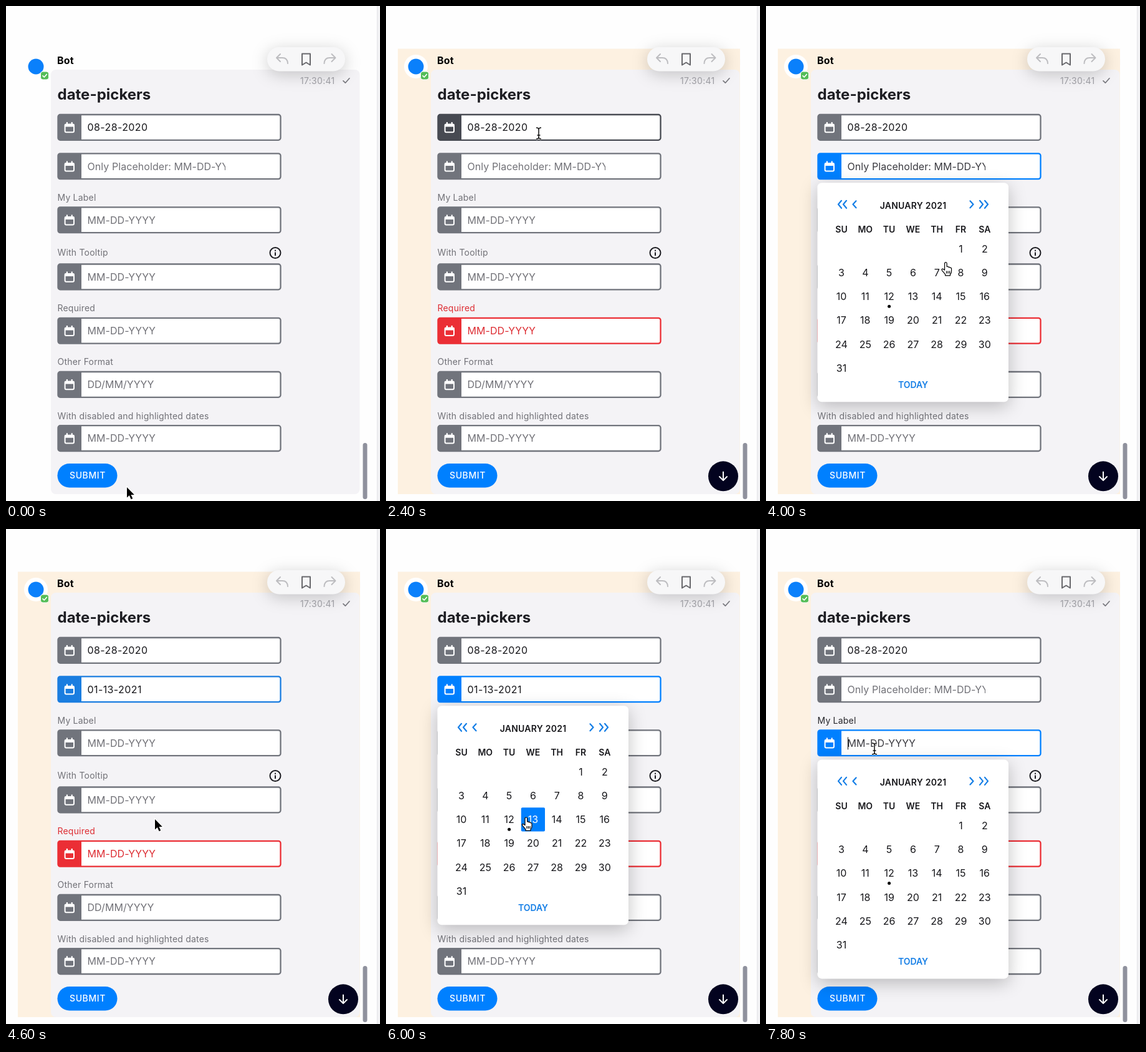
Animation of 600 by 793 pixels, one loop 8 s. Source, as an HTML page:

```html
<!DOCTYPE html>
<html lang="en">
<head>
<meta charset="utf-8">
<title>Date pickers</title>
<style>
html, body { margin: 0; width: 100%; height: 100%; overflow: hidden; background: #fff; }
svg { display: block; width: 100%; height: 100%; font-family: Inter, Roboto, sans-serif; }
.value { font-size: 16px; letter-spacing: .4px; }
.hint { font-size: 16px; letter-spacing: .06px; }
.label { font-size: 14px; letter-spacing: .2px; }
.day { font-size: 16px; text-anchor: middle; fill: #17171b; }
.cap { font-size: 14px; font-weight: 600; text-anchor: middle; fill: #17171b; }
.line { fill: none; stroke-linecap: round; stroke-linejoin: round; }
.pill { filter: drop-shadow(0 5px 13px rgba(0, 0, 0, .2)); }
.popup { filter: drop-shadow(0 7px 14px rgba(0, 0, 0, .24)); }
</style>
</head>
<body>
<svg viewBox="0 0 600 793" xmlns="http://www.w3.org/2000/svg">
  <defs>
    <clipPath id="input"><rect x="124" y="170" width="228" height="560"/></clipPath>
    <g id="calendar">
      <rect x="-7.2" y="-5" width="14.4" height="12.6" rx="2" fill="none" stroke="#fff" stroke-width="2"/>
      <path d="M-7.5-5.5h15v4.5h-15zM-5-8.5h2.2v4h-2.2zM2.8-8.5h2.2v4h-2.2z" fill="#fff"/>
    </g>
    <path id="arrow" d="M0 0v16.5l3.8-3.6 2.8 6.4 2.7-1.2-2.8-6.2h5.3z" stroke="#fff" stroke-width="2.2" paint-order="stroke"/>
    <path id="hand" d="M-2 1q0-2 2-2q1.6 0 1.6 2v5q2.4-.6 2.6.8q2.2-.4 2.4.8q2.4-.2 2.4 1.6v4q0 3-2 5v2h-8v-2l-5-6q-1.4-2 .2-2.6q1.4-.4 3.8 2zM1 13v4M3.5 13v4M6 13v4" fill="#fff" stroke="#000" stroke-width="1.2" stroke-linejoin="round"/>
    <path id="beam" d="M-4-9q4 0 4 3v12q0 3-4 3M4-9q-4 0-4 3M4 9q-4 0-4-3M-2.5 3h5" fill="none"/>
  </defs>
  <rect width="600" height="793" fill="#fefefe"/>
  <path d="M596 0h4v793h-4z" fill="#f3f3f5"/>
  <path d="M595.5 0v793" stroke="#e3e3e7"/>
  <rect x="572.5" y="700" width="7" height="90" rx="3.5" fill="#8f919d"/>
  <g id="glow">
    <path d="M19 68.5h549v713.5h-549z" fill="#fdf1e1"/>
    <circle cx="48" cy="97" r="19" fill="#fff"/>
  </g>
  <rect x="72" y="102" width="495.5" height="680" rx="8" fill="#f4f3f6"/>
  <circle cx="48" cy="97" r="12.5" fill="#0a80fb"/>
  <rect x="55.5" y="105" width="13" height="13" rx="3.5" fill="#54bd58" stroke="#fff"/>
  <path class="line" d="M59 111.8l2.3 2.2 4-4.6" stroke="#fff" stroke-width="1.6"/>
  <text x="82" y="93" font-size="16" font-weight="700" letter-spacing=".2">Bot</text>
  <g class="pill"><rect x="419" y="66" width="125" height="38.5" rx="19.2" fill="#f7f7f8"/></g>
  <g class="line" stroke="#bdbdc0" stroke-width="2">
    <path id="back" d="M440 77l-6 6 6 6M434.5 83h9q8 0 8.5 9"/>
    <use href="#back" transform="matrix(-1 0 0 1 962.5 0)"/>
    <path d="M475 76.5h13v18l-6.5-4-6.5 4z" stroke="#68686c"/>
  </g>
  <text x="472" y="124.5" font-size="14" letter-spacing=".3" fill="#9b9ba1">17:30:41</text>
  <path class="line" d="M541 119.8l3.4 3.4 6.6-7.4" stroke="#77777d" stroke-width="1.7"/>
  <text x="82.5" y="149.8" font-size="24" font-weight="700" fill="#1d1d22">date-pickers</text>
  <g fill="none" stroke="#1d1d22" stroke-width="2">
    <circle cx="432" cy="395.5" r="8.5"/>
    <path d="M432 394.5v5.5M432 390.8v2"/>
  </g>
  <g id="live"></g>
</svg>
<script>
const STEP = 200, STEPS = 40;
const GRAY = '#71747c', DARK = '#474a52', BLUE = '#0080ff', DIM_BLUE = '#1a7de0', RED = '#eb2e35';
const fields = [
  { y: 173 },
  { y: 235.3, hint: 'Only Placeholder: MM-DD-YYYY' },
  { y: 321.4, label: 'My Label', labelY: 306.5 },
  { y: 412.5, label: 'With Tooltip', labelY: 395 },
  { y: 498.8, label: 'Required', labelY: 483.5 },
  { y: 585, label: 'Other Format', labelY: 570, hint: 'DD/MM/YYYY' },
  { y: 671.2, label: 'With disabled and highlighted dates', labelY: 656.5 },
];
const months = {
  august: { title: 'AUGUST 2020', first: 6 },
  january: { title: 'JANUARY 2021', first: 5, today: 12 },
};

// Each entry changes the form from its step on.
const events = [
  [0, { glow: false, focus: -1, fading: -1, open: null, picked: 28, second: '', error: false, ring: false }],
  [3, { glow: true }],
  [5, { ring: true }],
  [8, { error: true }],
  [9, { ring: false }],
  [14, { focus: 0, open: 'august' }],
  [18, { focus: 1, open: 'january', picked: 0 }],
  [23, { focus: -1, fading: 1, open: null, second: '01-13-2021' }],
  [24, { fading: -1 }],
  [28, { focus: 1, open: 'january', picked: 13 }],
  [32, { focus: -1, fading: 1, open: null, second: '' }],
  [33, { fading: -1 }],
  [36, { focus: 2, open: 'january', picked: 0 }],
];
const path = [
  [0, 194, 771], [1, 192, 769], [3, 139, 758], [8, 139, 758], [12, 245, 204], [14, 245, 204],
  [17, 435, 260], [18, 433, 259], [21, 238, 465], [23, 239, 465], [24, 239, 465],
  [27, 228, 262], [28, 228, 263], [30, 225, 463], [32, 225, 463], [35, 176, 350], [39, 174, 352],
];

const live = document.getElementById('live');
const glow = document.getElementById('glow');
const inside = (p, x, y, w, h) => p.x >= x && p.x <= x + w && p.y >= y && p.y <= y + h;
const text = (cls, x, y, str, more = '') => `<text class="${cls}" x="${x}" y="${y}" ${more}>${str}</text>`;

function pointerAt(step) {
  const i = Math.max(1, path.findIndex(k => k[0] >= step));
  const [t0, x0, y0] = path[i - 1], [t1, x1, y1] = path[i];
  const u = (step - t0) / (t1 - t0), e = u * u * (3 - 2 * u);
  return { x: x0 + (x1 - x0) * e, y: y0 + (y1 - y0) * e };
}

function drawField(field, i, s, hovered) {
  const { y, label, labelY, hint = 'MM-DD-YYYY' } = field;
  const focused = s.focus === i, error = s.error && i === 4;
  const color = focused ? BLUE : s.fading === i ? DIM_BLUE : error ? RED : hovered ? DARK : GRAY;
  const value = i === 0 ? '08-28-2020' : i === 1 ? s.second : '';
  const ink = value ? '#17171b' : error ? '#dd2d33' : focused ? '#3a3a40' : '#717177';
  const labelInk = error ? '#dd2d33' : focused ? '#26262b' : '#717177';
  return (label ? text('label', 82.5, labelY + 5, label, `fill="${labelInk}"`) : '') +
    `<rect x="83.5" y="${y + 1}" width="357" height="40.8" rx="3.5" fill="#fff" stroke="${color}" stroke-width="2.3"/>
    <path d="M121 ${y + 1}v40.8h-35q-2.5 0-2.5-2.5v-35.8q0-2.5 2.5-2.5z" fill="${color}"/>
    <use href="#calendar" x="101.8" y="${y + 21.6}"/>
    <g clip-path="url(#input)">${text(value ? 'value' : 'hint', 130.5, y + 27.2, value || hint, `fill="${ink}"`)}</g>` +
    (focused && i === 2 ? `<path d="M131.5 ${y + 12}v20" stroke="#111"/>` : '');
}

function drawPopup(s) {
  const top = fields[s.focus].y + 48, { title, first, today } = months[s.open];
  const col = i => 121 + 38.3 * i;
  let out = `<g class="popup"><rect x="82.5" y="${top}" width="306.5" height="351" rx="7" fill="#fff"/></g>
    <path class="line" transform="translate(0 ${top + 34.5})" stroke="#167fe6" stroke-width="2.2"
      d="M121-6l-5 6 5 6M129-6l-5 6 5 6M144.5-5.5l-5 5.5 5 5.5M327.5-5.5l5 5.5-5 5.5M343-6l5 6-5 6M351-6l5 6-5 6"/>` +
    text('cap', 236, top + 41.2, title, 'letter-spacing=".25"') +
    text('cap', 236, top + 329, 'TODAY', 'style="fill:#167fe6"');
  ['SU', 'MO', 'TU', 'WE', 'TH', 'FR', 'SA'].forEach((d, i) => out += text('cap', col(i), top + 79.8, d));
  for (let d = 1; d <= 31; d++) {
    const cell = first + d - 1, x = col(cell % 7), y = top + 105.4 + 38.3 * Math.floor(cell / 7);
    const picked = d === s.picked;
    if (picked) out += `<rect x="${x - 19.1}" y="${y - 19.1}" width="38.2" height="38.2" rx="2" fill="${BLUE}"/>`;
    if (d === today) out += `<circle cx="${x}" cy="${y + 16}" r="2.5"/>`;
    out += text('day', x, y + 5.8, d, picked ? 'style="fill:#fff"' : '');
  }
  return out;
}

function drawSubmit(s, hovered) {
  return (s.ring ? '<rect x="82.5" y="733" width="96.5" height="39" rx="3" fill="#fff" stroke="#7fb9f8" stroke-width="2.2"/>' : '') +
    `<rect x="82.5" y="733" width="96" height="38.5" rx="19.2" fill="${hovered ? '#0570d8' : BLUE}"/>` +
    text('', 102, 757, 'SUBMIT', 'font-size="14" font-weight="500" letter-spacing=".6" fill="#fff"');
}

function drawPointer(kind, p) {
  const use = more => `<use href="#${kind}" x="${p.x}" y="${p.y}" ${more}/>`;
  return kind === 'beam' ? use('stroke="#fff" stroke-width="3"') + use('stroke="#111" stroke-width="1.5"') : use('');
}

function draw(step) {
  const s = Object.assign({}, ...events.filter(e => e[0] <= step).map(e => e[1]));
  const p = pointerAt(step);
  const overPopup = s.open && inside(p, 82, fields[s.focus].y + 48, 307, 351);
  const hovered = overPopup ? -1 : fields.findIndex(f => inside(p, 83, f.y, 358, 43));
  const overSubmit = !overPopup && inside(p, 83, 733, 96, 39);
  const kind = overPopup || overSubmit ? 'hand' : hovered >= 0 ? 'beam' : 'arrow';
  glow.style.display = s.glow ? '' : 'none';
  live.innerHTML = fields.map((f, i) => drawField(f, i, s, i === hovered)).join('') +
    drawSubmit(s, overSubmit) +
    (s.glow ? `<circle cx="541" cy="753.3" r="24" fill="#03031f"/>
      <path class="line" d="M541 746.5v13M535 754l6 6 6-6" stroke="#fff" stroke-width="2"/>` : '') +
    (s.open ? drawPopup(s) : '') + drawPointer(kind, p);
}

let shown = -1;
const start = performance.now();
function tick() {
  const step = Math.floor(Math.max(0, performance.now() - start) / STEP) % STEPS;
  if (step !== shown) draw(shown = step);
  requestAnimationFrame(tick);
}
tick();
</script>
</body>
</html>
```
